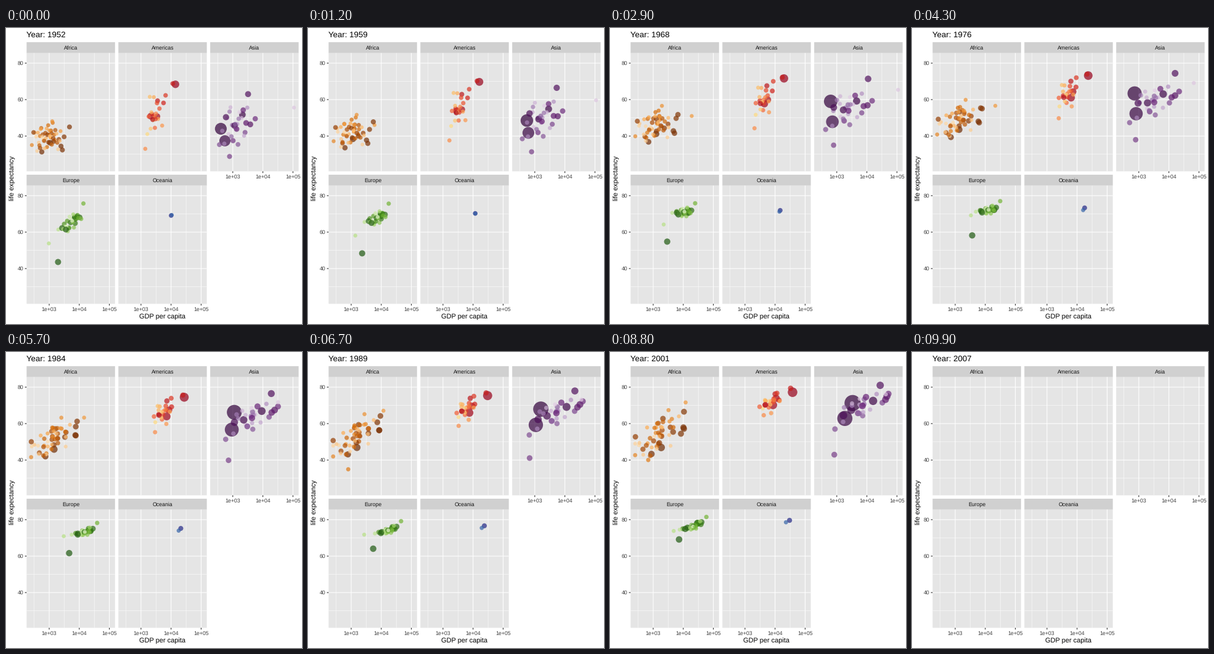
These frames come from a looping animation (480 by 480 pixels, 10 s). A matplotlib script:

```python
import numpy as np
import matplotlib.pyplot as plt
from matplotlib.animation import FuncAnimation
from matplotlib.colors import to_rgb
from matplotlib.patches import Rectangle

SIZE, DPI, FRAMES = 480, 100, 100
START, END = 1952, 2007
PX = 72 / DPI
PANEL_W, PANEL_H, STRIP_H, GAP = 143.37, 191.8, 17.6, 5.5
LEFT, TOP = 33.4, 40.6
DECADE, UNIT = 48.77, 2.955
KNOTS = (1952, 1967, 1987, 2007)

plt.rcParams["font.family"] = "Liberation Sans"
plt.rcParams["text.hinting"] = "none"


def ramp(stops, n):
    rgb = np.array([to_rgb(c) for c in stops]) ** 1.2
    at = np.linspace(0, len(stops) - 1, n)
    return np.column_stack([np.interp(at, range(len(stops)), ch) for ch in rgb.T])


def bell(rng, n):
    """Evenly filled bell-shaped sample in random order."""
    return rng.permutation(1.35 * np.arctanh(np.linspace(-0.9, 0.9, n)))


def text(ax, x, y, s, size, color="black", ha="center", **kw):
    return ax.text(x, y, s, fontsize=size * PX, color=color, ha=ha, **kw)


def line(ax, xs, ys, color, width):
    ax.plot(xs, ys, color=color, lw=width * PX, solid_capstyle="butt", snap=False, zorder=2)


class Panel:
    """One facet: a drifting cloud of dots, ranked by population.

    cloud: per knot year the mean and spread of log income, the mean life
    expectancy, its slope along income and its scatter.
    leads: rank -> (year, income, life) stops of dots with a path of their own.
    """

    def __init__(self, ax, name, col, row, n, colors, top, fall, share, leads,
                 cloud=np.zeros((4, 5)), giants={}, seed=1):
        self.x = LEFT + col * (PANEL_W + GAP)
        self.y = TOP + row * (PANEL_H + STRIP_H + GAP)
        self.cloud, self.leads, self.share = np.transpose(cloud), leads, share
        self.pop = top * np.exp(-np.arange(n) / fall)
        for rank, pop in giants.items():
            self.pop[rank] = pop
        rng = np.random.default_rng(seed)
        self.z = [bell(rng, n) for _ in range(4)]
        self.order = sorted(rng.permutation(n), key=lambda rank: rank > 1)
        self.frame(ax, name, bottom=(row == 1 or col == 2), left=(col == 0))
        self.dots = ax.scatter(np.zeros(n), np.zeros(n), lw=0, alpha=0.7,
                               c=ramp(colors, n)[self.order], zorder=3)

    def px(self, log_gdp):
        return self.x + (log_gdp - 2.2487) * DECADE

    def py(self, life):
        return self.y + (85.55 - life) * UNIT

    def frame(self, ax, name, bottom, left):
        x0, x1, y0, y1 = self.x, self.x + PANEL_W, self.y, self.y + PANEL_H
        for top, h, color in ((y0, PANEL_H, "#E5E5E5"), (y0 - STRIP_H, STRIP_H, "#D0D0D0")):
            ax.add_patch(Rectangle((x0, top), PANEL_W, h, fc=color, lw=0, snap=False))
        text(ax, (x0 + x1) / 2, y0 - 5.6, name, 8.8, "#141414")
        for v in (2.5, 3.5, 4.5, 3, 4, 5):
            line(ax, [self.px(v)] * 2, [y0, y1], "white", 1.07 if v % 1 == 0 else 0.53)
        for v in (30, 50, 70, 40, 60, 80):
            line(ax, [x0, x1], [self.py(v)] * 2, "white", 1.07 if v % 20 == 0 else 0.53)
        if bottom:
            for v in (3, 4, 5):
                line(ax, [self.px(v)] * 2, [y1, y1 + 2.75], "#262626", 1.07)
                text(ax, self.px(v), y1 + 11.6, f"1e+0{v}", 8.8, "#404040")
        if left:
            for v in (40, 60, 80):
                line(ax, [x0 - 2.75, x0], [self.py(v)] * 2, "#262626", 1.07)
                text(ax, x0 - 4.95, self.py(v) + 3.1, str(v), 8.8, "#404040", ha="right")

    def place(self, year, grown):
        mean, spread, level, slope, noise = (np.interp(year, KNOTS, c) for c in self.cloud)
        c, s = np.cos(0.6 * grown), np.sin(0.6 * grown)
        u = spread * (self.z[0] * c + self.z[1] * s)
        x = np.clip(mean + u, 2.4, 5.05)
        y = np.clip(level + slope * u + noise * (self.z[2] * c + self.z[3] * s), 24, 82.5)
        for rank, stops in self.leads.items():
            years, gdp, life = zip(*stops)
            x[rank] = np.interp(year, years, np.log10(gdp))
            y[rank] = np.interp(year, years, life)
        return x, y

    def update(self, year):
        grown = (year - START) / (END - START)
        x, y = self.place(year, grown)
        size = 2 + 10 * np.sqrt(self.pop * (self.share + (1 - self.share) * grown) / 1318)
        diameter = 0.75 * (size * 2.845 + 0.945) + 0.7
        self.dots.set_offsets(np.column_stack([self.px(x), self.py(y)])[self.order])
        self.dots.set_sizes((diameter[self.order] * PX) ** 2)


fig = plt.figure(figsize=(SIZE / DPI, SIZE / DPI), dpi=DPI, facecolor="white")
ax = fig.add_axes([0, 0, 1, 1])
ax.set_xlim(0, SIZE)
ax.set_ylim(SIZE, 0)
ax.set_autoscale_on(False)
ax.axis("off")

panels = [
    Panel(ax, "Africa", 0, 0, 52, ("#7F3B08", "#B35806", "#E08214", "#FDB863", "#FEE0B6"),
          top=80, fall=10, share=0.28, giants={0: 135}, seed=4,
          leads={
              0: [(1952, 1077, 36.3), (1987, 1500, 46.9), (2007, 2014, 46.9)],
              4: [(1952, 4725, 45), (1977, 8028, 55.5), (1992, 7225, 61.9), (2007, 9270, 49.3)],
              27: [(1952, 493, 40), (1987, 848, 44), (1992, 737, 23.6), (1997, 590, 36.1),
                   (2007, 863, 46.2)],
              34: [(1952, 2388, 42.7), (1967, 18773, 50.2), (1977, 21951, 57.4),
                   (1987, 11771, 66.2), (2007, 12057, 74)],
          },
          cloud=[(2.96, 0.27, 39, 4, 4.3), (3.08, 0.33, 45.5, 6, 4.8),
                 (3.14, 0.41, 53, 12, 4.5), (3.2, 0.45, 54.5, 12, 6)]),
    Panel(ax, "Americas", 1, 0, 25, ("#A50026", "#D73027", "#F46D43", "#FDAE61", "#FEE090"),
          top=55, fall=7.5, share=0.42, giants={0: 301, 1: 190, 2: 109}, seed=2,
          leads={
              0: [(1952, 13990, 68.4), (1977, 24073, 73.4), (2007, 42952, 78.2)],
              1: [(1952, 2109, 50.9), (1977, 6660, 61.5), (2007, 9066, 72.4)],
              2: [(1952, 3478, 50.8), (1977, 7675, 65), (2007, 11978, 76.2)],
              5: [(1952, 11367, 68.8), (1977, 22091, 74.2), (2007, 36319, 80.7)],
          },
          cloud=[(3.48, 0.17, 52, 18, 6.5), (3.62, 0.18, 60, 17, 5.5),
                 (3.76, 0.19, 68, 13, 3.5), (3.88, 0.22, 73.5, 8, 2.3)]),
    Panel(ax, "Asia", 2, 0, 33, ("#40004B", "#762A83", "#9970AB", "#C2A5CF", "#E7D4E8"),
          top=250, fall=7, share=0.4, giants={0: 1318, 1: 1110}, seed=3,
          leads={
              0: [(1952, 400, 44), (1957, 576, 50.5), (1962, 488, 44.5), (1967, 613, 58.4),
                  (1977, 741, 64), (1987, 1379, 67.3), (2007, 4959, 73)],
              1: [(1952, 547, 37.4), (1967, 701, 47.2), (1987, 977, 58.6), (2007, 2452, 64.7)],
              5: [(1952, 3217, 63), (1972, 14779, 73.4), (2007, 31656, 82.6)],
              12: [(1952, 779, 28.8), (1977, 786, 38.4), (1992, 649, 41.7), (2007, 975, 43.8)],
              31: [(1952, 108382, 55.6), (1972, 109348, 67.7), (1982, 31354, 71.3),
                   (2007, 47307, 77.6)],
          },
          cloud=[(3.15, 0.3, 47, 14, 6), (3.4, 0.36, 55, 10, 5),
                 (3.72, 0.4, 65.5, 9, 3.5), (3.95, 0.4, 71.5, 9, 3)]),
    Panel(ax, "Europe", 0, 1, 30, ("#276419", "#4D9221", "#7FBC41", "#B8E186", "#E6F5D0"),
          top=85, fall=6, share=0.75, seed=6,
          leads={
              0: [(1952, 7144, 67.5), (1977, 20513, 72.5), (2007, 32170, 79.4)],
              1: [(1952, 1969, 43.6), (1967, 2826, 54.3), (1987, 5089, 63.1),
                  (2007, 8458, 71.8)],
              23: [(1952, 974, 53.8), (1977, 3528, 69.9), (1992, 2547, 72.2),
                   (2007, 7446, 74.9)],
          },
          cloud=[(3.72, 0.21, 65.5, 14, 2.2), (4.0, 0.18, 71, 5, 1.4),
                 (4.2, 0.2, 73.8, 7, 1), (4.37, 0.21, 77.6, 7.5, 1)]),
    Panel(ax, "Oceania", 1, 1, 2, ("#313695", "#4575B4"), top=20.4, fall=0.62, share=0.44,
          leads={
              0: [(1952, 10040, 69.1), (1977, 18334, 73.5), (2007, 34435, 81.2)],
              1: [(1952, 10557, 69.4), (1977, 16234, 72.2), (2007, 25185, 80.2)],
          }),
]
title = text(ax, LEFT, 15, "", 13.2, ha="left")
text(ax, 254, 472, "GDP per capita", 11)
text(ax, 15.9, 244, "life expectancy", 11, ha="right", va="center", rotation=90)


def draw(i):
    year = START + (END - START) * i / (FRAMES - 1)
    title.set_text(f"Year: {round(year)}")
    for panel in panels:
        panel.dots.set_visible(i < FRAMES - 1)  # the dots vanish on arrival
        panel.update(year)


anim = FuncAnimation(fig, draw, frames=FRAMES, interval=100, repeat=True, repeat_delay=0)
plt.show()
```
